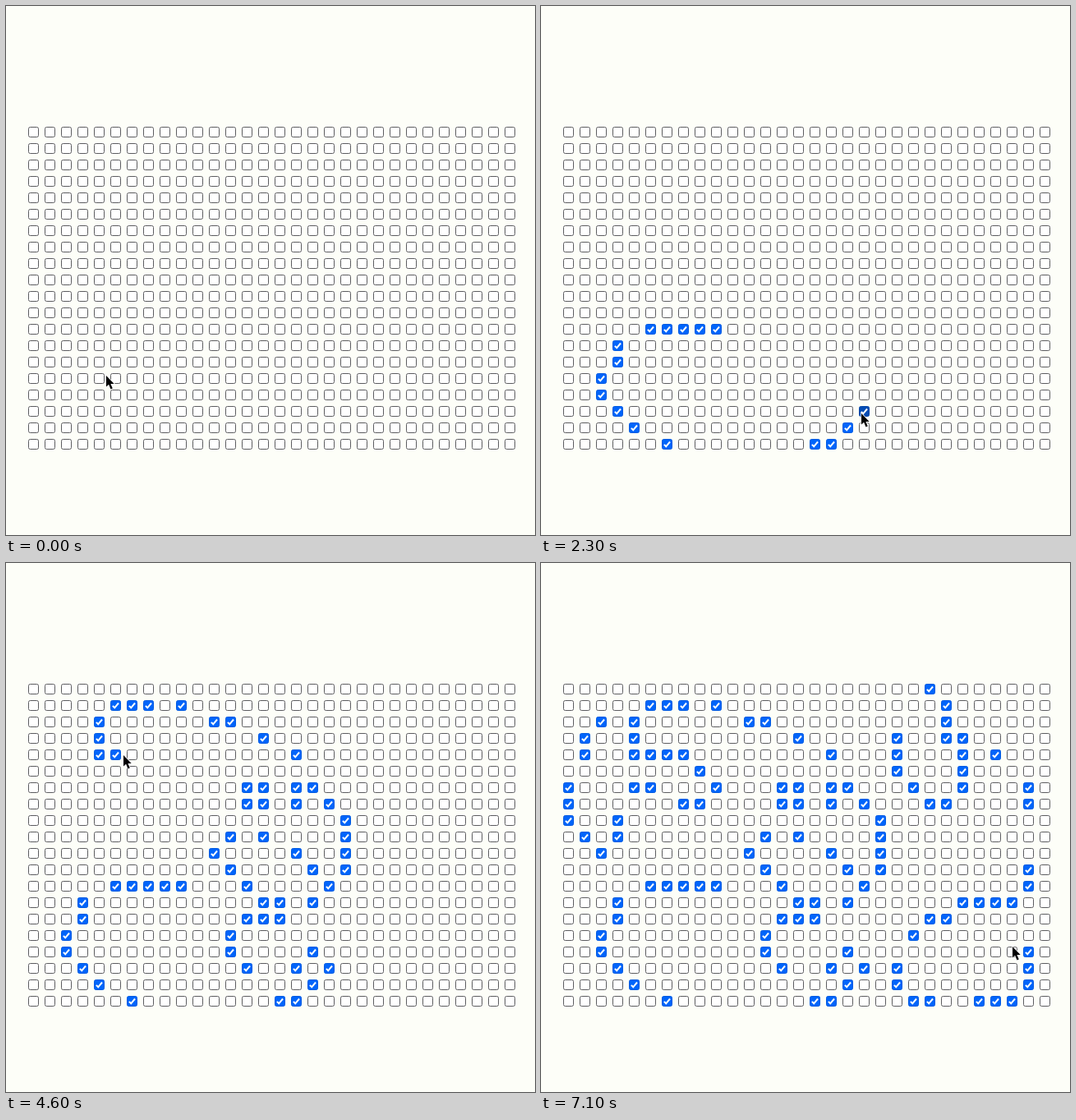
Animation, 644 px wide and 644 px high, one loop 7200 ms. Source, as an HTML page with a canvas:

```html
<!DOCTYPE html>
<html lang="en">
<head>
<meta charset="utf-8">
<title>Checkbox doodle</title>
<style>
html, body { margin: 0; width: 100%; height: 100%; overflow: hidden; background: #fdfef8; }
canvas { display: block; }
</style>
</head>
<body>
<canvas id="stage" width="644" height="644"></canvas>
<script>
const ctx = document.getElementById("stage").getContext("2d");
const COLS = 30, ROWS = 20, PITCH = 20, LEFT = 33.5, TOP = 153.5;
const STEP = 100, STEPS = 72, SAMPLES = 40, REACH = 0.31;

// Pointer routes in grid units. Each is followed at even speed between two steps;
// entering a box toggles it, running between the rows or columns leaves them alone.
const routes = [
  route(0, 10, "M4.4 14.8C1 17 0 20.8 2.5 20.8S6.5 17 4 13.8L10 12.5", false),
  route(14, 17, "M9.2 12L4.6 12.25 3 12.9V14.2L2.375 14.475"),
  route(17, 29, `M2.375 14.475L2 16 4 18 7.5 19.8 13 20.3 16 18.9 18.4 16.6 18.33 13.6
    17 11 16 10 12.9 8.47 11 10 14 13 15.375 13.425`),
  route(29, 39, `M15.375 13.425L15 14H13L12 15V16L13.6 17.6 15.2 17.55 17.33 15.7 17.36 13.6
    17.1 13 18 12.8 19 11V8.2L17.375 6.375`),
  route(39, 54, `M17.375 6.375L16 6.2 15 6.5 13 6V7L15 6.5 16.45 7.1 16.4 4.2 12 2H11L8 .5 7 1H5
    L4 2V4H7L9 6 8 7H7L5 6H4L3 8V9L2 10 0 8V6L1 4V3L2.3 1.7 2.5 -1 8.725 -1.775`),
  route(54, 63, `M8.725 -1.775L21 -1 23 1V2L24 3V6L23 7H22L20 5V2.5H22.4L23 3 23.5 3.5H25.4
    L26 4 26.5 4.5H27.525V5.625`),
  route(63, 71, `M27.525 5.625L27.2 5.3 28 6V7L28.5 7.8V10.2L28 11V12L27 13H24L23 14H22L21 15
    20 17V18L21 19H22L22.6 19.5H24.4L25 19H27L28 18V15.67H27`)
];

function route(start, end, d, clicks = true) {
  const path = document.createElementNS("http://www.w3.org/2000/svg", "path");
  path.setAttribute("d", d);
  return { start, end, path, clicks, length: path.getTotalLength() };
}

// Run the drawing once and keep the state at every step.
function record() {
  const states = [], checked = new Set();
  let inside = null, last = null;
  for (let i = 0; i < STEPS * SAMPLES; i++) {
    const t = i / SAMPLES;
    const now = routes.findLast(r => r.start <= t);
    const done = Math.min(1, (t - now.start) / (now.end - now.start));
    const { x, y } = now.path.getPointAtLength(done * now.length);
    const c = Math.round(x), r = Math.round(y);
    const onBox = c >= 0 && c < COLS && r >= 0 && r < ROWS &&
      Math.abs(x - c) < REACH && Math.abs(y - r) < REACH;
    const cell = now.clicks && onBox ? c * ROWS + r : null;
    if (cell !== null && cell !== inside) {
      if (!checked.delete(cell)) checked.add(cell);
      last = cell;
    }
    inside = cell;
    if (i % SAMPLES === 0) states.push({ x, y, last, checked: new Set(checked) });
  }
  return states;
}

function roundBox(x, y, size, radius) {
  ctx.beginPath();
  ctx.roundRect(x - size / 2, y - size / 2, size, size, radius);
}

function drawBox(x, y, checked, hot) {
  roundBox(x, y, 12, 2);
  ctx.lineWidth = 1;
  ctx.fillStyle = !checked ? "#fff" : hot ? "#054db5" : "#0065fa";
  ctx.strokeStyle = !checked ? "#5c5c60" : hot ? "#0445a4" : "#0059e0";
  ctx.fill();
  ctx.stroke();
  if (!checked) return;
  ctx.beginPath();
  ctx.moveTo(x - 3.6, y + 0.4);
  ctx.lineTo(x - 1.3, y + 2.8);
  ctx.lineTo(x + 3.5, y - 3);
  ctx.strokeStyle = "#fff";
  ctx.lineWidth = 2;
  ctx.stroke();
}

const arrow = new Path2D("M.5 .5V14L3.6 11.2 6 17 8.3 16 5.9 10.4H10.2Z");

function drawPointer(x, y) {
  ctx.save();
  ctx.translate(x - 0.5, y - 0.5);
  ctx.strokeStyle = "#fff";
  ctx.lineWidth = 1.4;
  ctx.stroke(arrow);
  ctx.fillStyle = "#000";
  ctx.fill(arrow);
  ctx.restore();
}

function draw({ x, y, last, checked }) {
  ctx.fillStyle = "#fdfef8";
  ctx.fillRect(0, 0, 644, 644);
  for (let c = 0; c < COLS; c++) {
    for (let r = 0; r < ROWS; r++) {
      const cell = c * ROWS + r;
      const hot = cell === last && c > x && c - x < 0.8 && Math.abs(r - y) < 0.7;
      drawBox(LEFT + c * PITCH, TOP + r * PITCH, checked.has(cell), hot);
    }
  }
  drawPointer(Math.round(LEFT + x * PITCH), Math.round(TOP + y * PITCH));
}

const states = record();
let shown = -1;
function tick() {
  const step = Math.floor(performance.now() / STEP) % STEPS;
  if (step !== shown) draw(states[shown = step]);
  requestAnimationFrame(tick);
}
tick();
</script>
</body>
</html>
```
